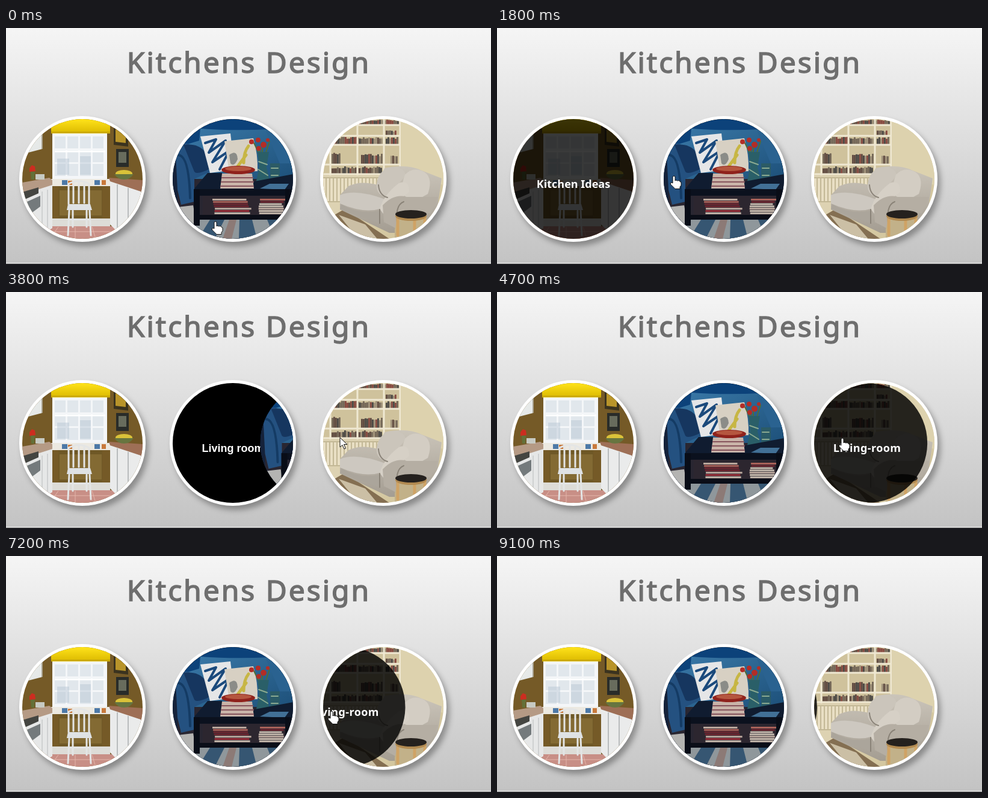
These frames come from a looping animation (806 px wide and 394 px high, 9.2 s). An HTML page:

```html
<!DOCTYPE html>
<html lang="en">
<head>
<meta charset="utf-8">
<title>Kitchens Design</title>
<style>
  html, body { margin: 0; width: 100%; height: 100%; overflow: hidden; }
  svg { display: block; width: 100vw; height: 100vh; }
  text { font: 600 18px "Noto Sans", "Open Sans", sans-serif; text-anchor: middle; fill: #fff; }
  .title { font-size: 48px; font-weight: 400; letter-spacing: 2.95px; fill: #6e6e6e; stroke: #6e6e6e; stroke-width: 1.5px; }
  .plain { font: bold 18px "Liberation Sans", Arial, sans-serif; }
  .spaced { letter-spacing: .4px; }
  .ring { fill: #fff; filter: drop-shadow(5px 7px 5px rgba(0, 0, 0, .32)); }
  .line { fill: none; stroke-linecap: round; stroke-linejoin: round; }
</style>
</head>
<body>
<svg viewBox="0 0 806 394" xmlns="http://www.w3.org/2000/svg">
  <defs>
    <linearGradient id="sky" x2="0" y2="1">
      <stop stop-color="#f5f5f5"/><stop offset="1" stop-color="#c3c3c3"/>
    </linearGradient>
    <linearGradient id="blind" x2="0" y2="1">
      <stop stop-color="#ffe31a"/><stop offset="1" stop-color="#dbb900"/>
    </linearGradient>
    <linearGradient id="couch" x2="1" y2="1">
      <stop stop-color="#3a79a8"/><stop offset="1" stop-color="#1b4d76"/>
    </linearGradient>
    <linearGradient id="cream" x2="1" y2="1">
      <stop stop-color="#e9e0c0"/><stop offset="1" stop-color="#cdbf96"/>
    </linearGradient>
    <linearGradient id="linen" x2="0" y2="1">
      <stop stop-color="#cbc5ba"/><stop offset="1" stop-color="#a49d92"/>
    </linearGradient>
    <clipPath id="disc"><circle cx="100" cy="100" r="100"/></clipPath>
  </defs>

  <rect width="806" height="394" fill="url(#sky)"/>
  <path d="M0 392.5H806" stroke="#f4f4f4"/>
  <path d="M0 393.5H806" stroke="#858585"/>
  <text class="title" x="403.5" y="75">Kitchens Design</text>

  <!-- Kitchen: the cover fades -->
  <g transform="translate(27 152)">
    <circle class="ring" cx="100" cy="100" r="105"/>
    <g clip-path="url(#disc)">
      <rect width="200" height="200" fill="#755a27"/>
      <path d="M0 0H33V50L10 56L0 50Z" fill="#e6e9e8"/>
      <path d="M33 0V50" stroke="#a9a28f" stroke-width="2"/>
      <rect x="50" y="24" width="91" height="78" fill="#f4f6f8"/>
      <g id="panes"></g>
      <path d="M58 66h20v27H58zM96 62h18v31H96z" fill="#b4c3d0" opacity=".45"/>
      <path d="M54 54H138" stroke="#fff" stroke-width="3"/>
      <rect x="48" width="98" height="24" fill="url(#blind)"/>
      <path d="M48 22H146" stroke="#c8a703" stroke-width="2"/>
      <path d="M152 12l24 4v30l-24-3z" fill="#3b331f"/>
      <path d="M155 17l17 3v20l-17-2z" fill="#b8942a"/>
      <rect x="156" y="50" width="21" height="30" fill="#292c29"/>
      <rect x="160" y="55" width="13" height="18" fill="#686c5d"/>
      <rect x="48" y="100" width="98" height="12" fill="#ece9e1"/>
      <path d="M66 102h9v8h-9zM120 102h9v8h-9z" fill="#4d79a7"/>
      <path d="M76 103h7v7h-7zM132 102h7v8h-7z" fill="#c8793b"/>
      <rect x="60" y="112" width="73" height="54" fill="#6f5826"/>
      <rect x="62" y="119" width="70" height="42" fill="#836a33"/>
      <path d="M48 166H146V180H48Z" fill="#dddcd7"/>
      <path d="M40 179H150L184 200H14Z" fill="#c88f86"/>
      <path d="M34 188H166M60 180L46 200M88 180V200M116 180L122 200" stroke="#e4b5aa"/>
      <path d="M0 106L45 98L50 102V112L0 128Z" fill="#b59a85"/>
      <path d="M0 126L50 110V182L32 194L0 164Z" fill="#e6e7e7"/>
      <path d="M0 122L27 114V124L0 136Z" fill="#444541"/>
      <path d="M8 138L30 128V146L14 158Z" fill="#747a7c"/>
      <path d="M33 121V186M42 118V182" stroke="#b7babb"/>
      <path d="M12 82l4-5 5 2 1 8-10 1z" fill="#cc2d20"/>
      <path d="M14 88h7l-1 13h-5z" fill="#637038"/>
      <path d="M22 92h15v9H22z" fill="#c7cac3"/>
      <path d="M144 98L200 102V124L146 104Z" fill="#9e6f56"/>
      <path d="M146 104L200 122V170L164 194L146 176Z" fill="#eaebeb"/>
      <path d="M158 109V188M176 115V182" stroke="#b9bcbd" stroke-width="2"/>
      <ellipse cx="169" cy="91" rx="14" ry="6" fill="#dac239"/>
      <path d="M153 92H185Q179 101 169 101T153 92Z" fill="#677540"/>
      <path class="line" d="M77 142V108Q94 99 111 108V142M85 106V140M94 104V140M103 106V140" stroke="#e4e5e5" stroke-width="3"/>
      <path d="M76 142H113L116 152H74Z" fill="#dfe2e4"/>
      <path class="line" d="M78 153L76 194M112 153L114 194M84 153V180M107 153V180M80 168H111" stroke="#e3e5e5" stroke-width="3"/>
      <g id="kitchenCover">
        <circle cx="100" cy="100" r="101" fill="#000" opacity=".77"/>
        <text x="100" y="115">Kitchen Ideas</text>
      </g>
    </g>
  </g>

  <!-- Blue room: the picture slides away from a black disc -->
  <g transform="translate(277 152)">
    <circle class="ring" cx="100" cy="100" r="105"/>
    <g clip-path="url(#disc)">
      <rect width="200" height="200"/>
      <text class="plain" x="100" y="115">Living room</text>
      <g id="bluePicture"><g clip-path="url(#disc)">
        <rect width="200" height="200" fill="#0c427a"/>
        <path d="M46 16Q100 20 163 17L194 34L200 104L20 116L18 44L44 36Z" fill="url(#couch)"/>
        <path d="M155 20L178 74H200V32Z" fill="#2a6290"/>
        <path d="M0 100H200V200H0Z" fill="#292631"/>
        <path d="M0 148L34 144L44 200H0Z" fill="#b4b4b2"/>
        <path d="M0 62L8 58V140L0 120Z" fill="#15223a"/>
        <path d="M5 60Q10 36 28 42L44 56L62 88L36 100V138L14 143L8 118Z" fill="#245180"/>
        <path class="line" d="M9 60Q27 60 29 132" stroke="#143b64" stroke-width="4"/>
        <path d="M18 43Q42 40 53 54L64 82Q40 94 36 88Z" fill="#16365f"/>
        <path d="M46 29L96 24Q100 54 100 85L62 90Z" fill="#e5e6e7"/>
        <path class="line" d="M54 40L72 34L60 56L88 36L66 72L94 53L78 84" stroke="#1b4a7c" stroke-width="4"/>
        <path d="M86 37L134 32Q142 59 141 87L94 89Z" fill="#d7d0c3"/>
        <path class="line" d="M118 73Q118 55 126 45M108 79L122 60" stroke="#c7b644" stroke-width="5"/>
        <path d="M94 60q13-10 14 7q-6 14-12 7z" fill="#8b8c88"/>
        <path class="line" d="M147 65L135 40M149 65L149 39M152 65L161 37M149 65L143 47" stroke="#526c35" stroke-width="2"/>
        <g fill="#b32d26"><circle cx="131" cy="38" r="4"/><circle cx="142" cy="35" r="4"/><circle cx="151" cy="43" r="5"/><circle cx="158" cy="35" r="3"/><circle cx="143" cy="49" r="4"/></g>
        <path d="M141 55H160L156 80L162 108H138L144 80Z" fill="#2a5f68"/>
        <path d="M162 74H178V107H162Z" fill="#2b5b66"/>
        <path class="line" d="M143 71L157 76M142 84L158 94M164 82H175M164 94H175" stroke="#8baa91" stroke-width="2"/>
        <path d="M36 116L58 90H82V104H136L200 92V118H36Z" fill="#101c30"/>
        <path d="M145 116L161 108H193L186 118Z" fill="#427096"/>
        <path d="M82 91H132L135 116H79Z" fill="#c9b3a8"/>
        <path d="M81 98H134M80 105H135M79 112H135" stroke="#86545c" stroke-width="2"/>
        <ellipse cx="109" cy="85" rx="28" ry="7" fill="#8f221c"/>
        <ellipse cx="109" cy="83" rx="22" ry="4" fill="#b5563f"/>
        <path d="M36 117H200V128H36Z" fill="#0b111e"/>
        <path d="M50 128H188V160H50Z" fill="#2c262f"/>
        <g id="magazines"></g>
        <path d="M35 160H191V168H35Z" fill="#0b0e18"/>
        <path d="M42 168H190L200 200H36Z" fill="#8f979b"/>
        <path d="M62 168H86L70 200H42ZM111 168H132L140 200H110ZM157 168H177L195 200H170Z" fill="#365672"/>
        <path d="M94 168H106L98 200H83Z" fill="#8c7a76"/>
        <path d="M35 117H45V178H35ZM187 117H195V172H187Z" fill="#090d17"/>
      </g></g>
    </g>
  </g>

  <!-- Cream room: the cover slides in from the left -->
  <g transform="translate(527 152)">
    <circle class="ring" cx="100" cy="100" r="105"/>
    <g clip-path="url(#disc)">
      <rect width="200" height="200" fill="url(#cream)"/>
      <rect width="128" height="96" fill="#cfc29c"/>
      <g id="books"></g>
      <path class="line" d="M0 10H128M0 28H128M0 43H128M0 76H128M0 92H128M12 0V94M57 0V94M101 0V94M128 0V96" stroke="#efe8d2" stroke-width="3"/>
      <path d="M129 0L200 36V110L129 92Z" fill="#ddd2ae"/>
      <path d="M0 94H128V158H0Z" fill="#ddd2b2"/>
      <rect y="97" width="96" height="42" fill="#c3b896"/>
      <g id="radiator"></g>
      <path d="M12 164L36 150L110 200H30Z" fill="#846f52"/>
      <path d="M26 160L70 176L90 200H58Z" fill="#cbbfa5"/>
      <path d="M42 112Q62 102 91 110L102 82Q139 74 164 86L197 99L190 147L164 190H110L28 151V127Z" fill="url(#linen)"/>
      <path d="M90 103Q96 80 120 80Q137 84 137 94L108 131Q84 127 90 103Z" fill="#cbc5bb"/>
      <path d="M136 93Q150 78 169 89Q183 99 174 125L149 139Q123 127 136 93Z" fill="#d3cdc3"/>
      <path d="M28 127Q54 116 103 134L94 150Q67 158 28 141Z" fill="#cdc8c0"/>
      <path d="M94 150Q101 126 126 107Q143 101 143 121L124 139L105 165Z" fill="#d6d0c6"/>
      <path d="M99 144Q118 124 139 130H191L179 157H132L124 184L101 172Z" fill="#b5aea3"/>
      <path d="M30 142Q63 161 93 153L94 174L28 151Z" fill="#aba59b"/>
      <path class="line" d="M92 110Q93 127 107 131M94 151V174M134 138Q118 144 124 180" stroke="#8a8378" stroke-width="2"/>
      <path d="M119 184L126 159H170L173 200H119Z" fill="#c2b189"/>
      <path class="line" d="M124 160V194M169 160V194M152 164V200" stroke="#cfa365" stroke-width="5"/>
      <ellipse cx="146" cy="162" rx="26" ry="8" fill="#b18a51"/>
      <ellipse cx="146" cy="159" rx="26" ry="7" fill="#25211e"/>
      <g id="creamCover">
        <circle cx="100" cy="100" r="100" fill="#000" opacity=".83"/>
        <text class="spaced" x="100" y="115">Living-room</text>
      </g>
    </g>
  </g>

  <g id="cursor" fill="#fff" stroke="#111" stroke-linejoin="round">
    <path id="arrow" d="M0 0V16L4 12.500L7 19L9.500 18L6.500 11.500H12Z"/>
    <path id="hand" d="M-2 12V2a2 2 0 0 1 4 0V8l1-1 2 .5 1 1 1-1 2 .5 1 1.500 2 1v5l-2 3v3h-8L-5.500 14q-1-3 1.500-3z"/>
  </g>
</svg>

<script>
const LOOP = 9200, STEP = 100;
const el = id => document.getElementById(id);
const rect = (x, y, w, h, fill) => `<rect x="${x}" y="${y}" width="${w}" height="${h}" fill="${fill}"/>`;
const repeat = (n, draw) => Array.from({ length: n }, (_, i) => draw(i)).join("");

let seed = 7;
const random = () => (seed = seed * 16807 % 2147483647) / 2147483647;
const pick = list => list[Math.floor(random() * list.length)];

// Repeated details of the three rooms
el("panes").innerHTML = repeat(12, i => rect(54 + i % 4 * 21, 29 + Math.floor(i / 4) * 23, 18, 20, "#e1e7ec"));
el("radiator").innerHTML = repeat(16, i => rect(i * 6, 99, 4, 38, "#e9dfc4"));
el("magazines").innerHTML = repeat(14, i => {
  const right = i > 6, row = i % 7;
  return rect((right ? 141 : 66) + random() * 5, 133 + row * 3.8, (right ? 43 : 62) - random() * 6, 3,
    pick(["#96303a", "#b9a79c", "#a86259", "#6c2630", "#c4b8ac"]));
});
const bookRow = (from, to, base, height) => repeat(Math.floor((to - from) / 3), i => {
  const h = height * (.7 + random() * .3);
  return rect(from + i * 3, base - h, 2.8, h, pick(["#5f4a40", "#85483f", "#4a4844", "#9d8f78", "#736657"]));
});
el("books").innerHTML = bookRow(60, 128, 9, 8) + bookRow(15, 99, 42, 13) + bookRow(104, 124, 28, 9) +
  bookRow(104, 126, 42, 12) + bookRow(14, 31, 75, 19) + bookRow(63, 99, 75, 18) +
  bookRow(112, 126, 75, 14) + bookRow(14, 99, 91, 12);

// The CSS "ease" curve, solved by bisection
function ease(x) {
  if (x <= 0) return 0;
  if (x >= 1) return 1;
  const bezier = (s, a, b) => 3 * s * (1 - s) ** 2 * a + 3 * s * s * (1 - s) * b + s ** 3;
  let low = 0, high = 1;
  for (let i = 0; i < 20; i++) {
    const mid = (low + high) / 2;
    if (bezier(mid, .25, .25) < x) low = mid; else high = mid;
  }
  return bezier(low, .1, 1);
}
const hover = (t, enter, leave, duration) => ease((t - enter) / duration) - ease((t - leave) / duration);

// Pointer path: time, x, y
const path = [
  [0, 348, 323], [100, 395, 300], [300, 200, 275], [600, 140, 275], [1500, 140, 275],
  [1700, 285, 249], [1800, 294, 247], [2400, 331, 250], [3200, 331, 250], [3800, 555, 243],
  [4000, 697, 240], [4500, 574, 244], [5300, 574, 244], [5900, 490, 250], [6300, 490, 250],
  [6700, 541, 259], [8100, 541, 259], [8300, 262, 372], [8400, 258, 395]
];
function pointer(t) {
  const next = path.findIndex(p => p[0] > t);
  if (next < 0) return path[path.length - 1].slice(1);
  if (next === 0) return path[0].slice(1);
  const [t0, x0, y0] = path[next - 1], [t1, x1, y1] = path[next];
  const k = (t - t0) / (t1 - t0);
  return [x0 + (x1 - x0) * k, y0 + (y1 - y0) * k];
}
const overDisc = ([x, y]) => [127, 377, 627].some(cx => Math.hypot(x - cx, y - 252) < 105);
const show = (id, on) => el(id).setAttribute("visibility", on ? "visible" : "hidden");
const move = (id, x, y = 0) => el(id).setAttribute("transform", `translate(${x} ${y})`);

function draw() {
  const t = Math.floor(performance.now() % LOOP / STEP) * STEP;
  el("kitchenCover").setAttribute("opacity", hover(t, 330, 1850, 500));
  move("bluePicture", 200 * hover(t, 1910, 3610, 1000));

  // This cover waits half a second after the pointer enters or leaves
  const cover = hover(t, 4350, 6170, 500) + hover(t, 7000, 8700, 500);
  move("creamCover", 200 * (cover - 1));

  // The pointer shape reacts one step late
  const hand = overDisc(pointer(t - STEP)), visible = t < 8400;
  move("cursor", ...pointer(t));
  show("hand", visible && hand);
  show("arrow", visible && !hand);
  requestAnimationFrame(draw);
}
draw();
</script>
</body>
</html>
```
